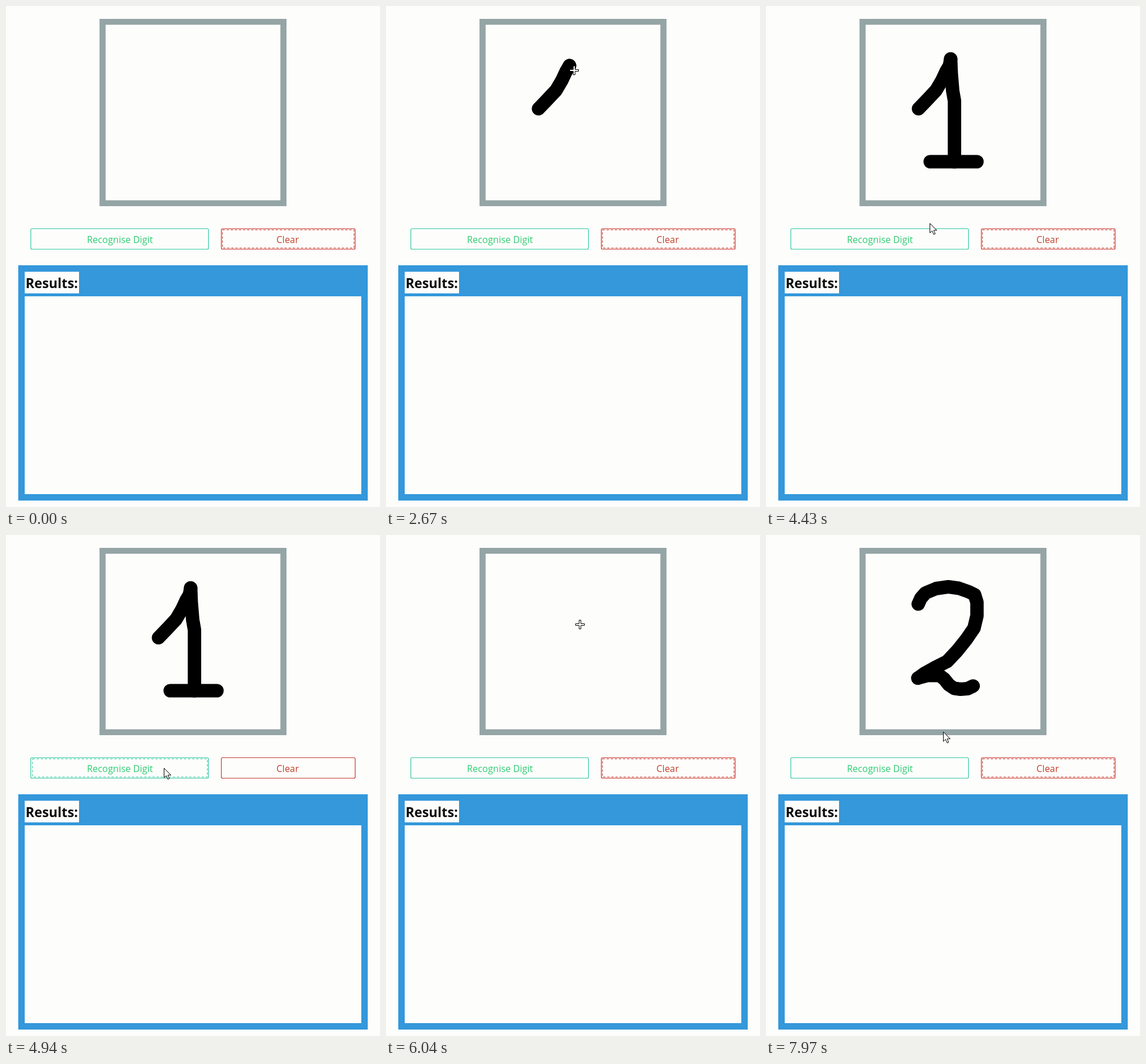
Animation of 640x856 px, one loop 8 s. Source, as an HTML page:

```html
<!DOCTYPE html>
<html lang="en">
<head>
<meta charset="utf-8">
<title>Digit recogniser</title>
<style>
  html, body { margin: 0; width: 100%; height: 100%; overflow: hidden; background: #fdfdfc; }
  svg { display: block; width: 640px; height: 856px; }
  .paper { fill: #fdfdfc; }
  .button rect { fill: #fdfdfc; stroke: var(--line); stroke-width: 1.2; }
  .button .focus { fill: none; stroke-width: 1; stroke-dasharray: 4 3; }
  .button text { font: 15.9px "Open Sans", "Noto Sans", sans-serif; fill: var(--label); text-anchor: middle; }
  .go { --line: #35c9a0; --label: #2ecc71; }
  .clear { --line: #c8392f; --label: #c5402b; }
  .title { font: bold 22.8px "Open Sans", "Noto Sans", sans-serif; fill: #0c0c0c; }
  #results { font: 500 19.62px "Noto Sans Mono", "DejaVu Sans Mono", monospace; fill: #000; }
  #ink path { fill: none; stroke: #000; stroke-width: 23; stroke-linecap: round; stroke-linejoin: round; }
  .cursor { fill: #fff; stroke: #000; }
</style>
</head>
<body>
<svg viewBox="0 0 640 856">
  <rect class="paper" width="640" height="856"/>
  <rect x="160" y="22" width="320" height="320" fill="#95a5a6"/>
  <rect class="paper" x="170.5" y="32" width="299" height="300"/>
  <g id="ink"></g>

  <g class="button go">
    <rect x="42.5" y="380.5" width="304" height="35" rx="2"/>
    <rect class="focus" id="goFocus" x="45.5" y="382.5" width="299" height="31"/>
    <text x="195" y="404.5">Recognise Digit</text>
  </g>
  <g class="button clear">
    <rect x="368.5" y="380.5" width="229" height="35" rx="2"/>
    <rect class="focus" id="clearFocus" x="370.5" y="382.5" width="225" height="31"/>
    <text x="482" y="404.5">Clear</text>
  </g>

  <rect x="21" y="443" width="598" height="402" fill="#3498db"/>
  <rect class="paper" x="32" y="454" width="93" height="37"/>
  <text class="title" x="33.5" y="482">Results:</text>
  <rect class="paper" x="32" y="496" width="576" height="338"/>
  <g id="results"></g>

  <path class="cursor" id="cross" d="M-1.5-7.5h3v6h6v3h-6v6h-3v-6h-6v-3h6z"/>
  <path class="cursor" id="arrow" d="M.5.5V16.7L4.3 13.2L7 19.3L9.6 18.2L7 12.2H12.2z"/>
</svg>
<script>
  const LOOP = 8000, APPEAR = 1350, PRESS = 4750, ANSWER = 5020, CLEAR = 5760;
  const BRUSH_OFFSET = 8;
  const NS = "http://www.w3.org/2000/svg";
  const $ = id => document.getElementById(id);

  function add(parent, tag, attrs) {
    const el = document.createElementNS(NS, tag);
    for (const key in attrs) el.setAttribute(key, attrs[key]);
    return parent.appendChild(el);
  }

  const show = (el, on) => { el.style.display = on ? "" : "none"; };

  // [start, end, path, time the ink is wiped]; moves without ink follow the pointer itself
  const track = [
    [1350, 1560, "M372 196L277 182"],
    [1560, 1700, "M277 182L269 184"],
    [1750, 2670, "M261 175.5L275 161L291 144L301 127L308 112L314 102", CLEAR],
    [2670, 2860, "M314 102L316 90.5", CLEAR],
    [2900, 3330, "M316 90.5L317 115L319.5 145L322.5 162V170", CLEAR],
    [3330, 3640, "M322.5 170V266", CLEAR],
    [3660, 3800, "M330 274L289 274"],
    [3830, 4120, "M281 266H361", CLEAR],
    [4150, 4430, "M369 274Q320 320 280 371"],
    [4430, 4680, "M280 371L270 398"],
    [5080, 5370, "M270 398L353 400"],
    [5370, 5620, "M353 400L416 398"],
    [5800, 6040, "M416 398Q372 230 332 153"],
    [6040, 6300, "M332 153L269 126"],
    [6360, 7160, "M260.5 118L265 108L273 99L291 91.5L312 88.5L330 91L347 97L357 102L361 115V138L356 159L343 178L327 198L310 216L290 226L272 236L260 244.5", LOOP],
    [7160, 7600, "M260 244.5L277 240H297L305 246L313 256L322 262L333 263.5L345 262.5L354.5 258", LOOP],
    [7650, 7970, "M363 266Q330 300 303 336"]
  ].map(([start, end, d, wipe]) => {
    const path = add($("ink"), "path", { d });
    const length = path.getTotalLength();
    if (!wipe) path.style.display = "none";
    return { start, end, path, length, wipe };
  });

  const scores = [[1, "99.92"], [7, "0.03"], [5, "0.02"], [4, "0.02"], [2, "0.01"],
                  [6, "0.01"], [9, "0.00"], [3, "0.00"], [8, "0.00"], [0, "0.00"]];
  scores.forEach(([digit, percent], i) => {
    add($("results"), "text", { x: 39.8, y: 524.5 + i * 24.6 }).textContent = `Digit ${digit}: ${percent}%`;
  });

  const smooth = u => u * u * (3 - 2 * u);

  function progress(step, t) {
    const u = Math.min(1, Math.max(0, (t - step.start) / (step.end - step.start)));
    return step.wipe ? u : smooth(u);
  }

  function drawInk(t) {
    for (const step of track) {
      if (!step.wipe) continue;
      show(step.path, t >= step.start && t < step.wipe);
      step.path.style.strokeDasharray = `${step.length * progress(step, t) + 0.1} ${step.length * 2}`;
    }
  }

  function drawPointer(t) {
    const step = track.filter(s => s.start <= t).pop() || track[0];
    const point = step.path.getPointAtLength(step.length * progress(step, t));
    const shift = step.wipe ? BRUSH_OFFSET : 0;
    const x = point.x + shift, y = point.y + shift;
    const overCanvas = x > 170 && x < 470 && y > 32 && y < 332;
    const visible = t >= APPEAR;
    for (const [el, on] of [[$("cross"), overCanvas], [$("arrow"), !overCanvas]]) {
      show(el, visible && on);
      el.setAttribute("transform", `translate(${Math.round(x)} ${Math.round(y)})`);
    }
  }

  function render(now) {
    const t = now % LOOP;
    const goFocused = t >= PRESS && t < CLEAR;
    drawInk(t);
    drawPointer(t);
    show($("goFocus"), goFocused);
    show($("clearFocus"), !goFocused);
    show($("results"), t >= ANSWER && t < CLEAR);
  }

  const began = performance.now();
  function tick() {
    render(performance.now() - began);
    requestAnimationFrame(tick);
  }
  tick();
</script>
</body>
</html>
```
